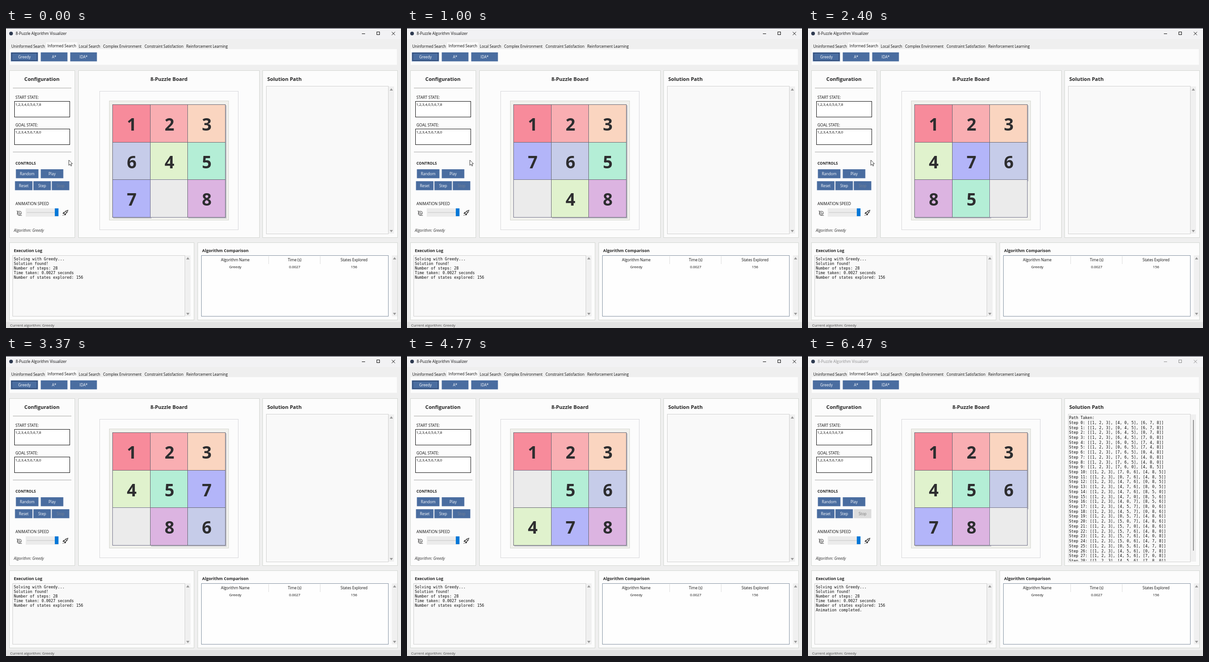
An HTML page with a canvas for the animation above (6500 ms loop, 858 by 652 pixels).

```html
<!DOCTYPE html>
<html lang="en">
<head>
<meta charset="utf-8">
<title>8-Puzzle</title>
<style>
html, body { margin: 0; width: 100%; height: 100%; overflow: hidden; background: #efefef; }
canvas { display: block; }
</style>
</head>
<body>
<canvas id="stage" width="858" height="652"></canvas>
<script>
const ctx = document.getElementById('stage').getContext('2d');
const LOOP = 6500, CURSOR_GONE = 2900, DONE = 6330;
const SANS = '"Open Sans", "Noto Sans", sans-serif';
const MONO = '"DejaVu Sans Mono", "Noto Sans Mono", monospace';
const INK = '#0c0c0c', BLUE = '#4a6da0', PANEL = '#fcfcfc', EDGE = '#d3d6d2';
const TILES = ['#ebebeb', '#f78b9b', '#f9aeb2', '#fad5c0', '#e0f2cd', '#b4eed6', '#c6cce9', '#b3b5f9', '#dcb4e1'];

// Every board along the solution, from the moves of the blank.
const OFFSET = { L: -1, R: 1, U: -3, D: 3 };
const states = [[1, 2, 3, 4, 0, 5, 6, 7, 8]];
for (const move of 'LDRULDRRULLDRRULDLURRDLULDRR') {
  const next = [...states.at(-1)];
  const blank = next.indexOf(0), other = blank + OFFSET[move];
  [next[blank], next[other]] = [next[other], 0];
  states.push(next);
}

// Solver pace: [step, time in ms], evenly spaced in between.
const PACE = [[3, 0], [7, 1010], [14, 2390], [23, 4280], [28, 5220]];

function stepAt(time) {
  for (let i = 1; i < PACE.length; i++) {
    const [s0, t0] = PACE[i - 1], [s1, t1] = PACE[i];
    if (time < t1) return Math.floor(s0 + (s1 - s0) * (time - t0) / (t1 - t0));
  }
  return 28;
}

function box(x, y, w, h, fill, stroke) {
  ctx.fillStyle = fill;
  ctx.fillRect(x, y, w, h);
  if (!stroke) return;
  ctx.strokeStyle = stroke;
  ctx.lineWidth = 1;
  ctx.strokeRect(x + 0.5, y + 0.5, w - 1, h - 1);
}

// y is the middle of the capitals.
function text(str, x, y, { size = 8.1, color = INK, style = '', align = 'left', font = SANS } = {}) {
  ctx.font = `${style} ${size}px ${font}`;
  ctx.textAlign = align;
  ctx.fillStyle = color;
  ctx.fillText(str, x, y + size * 0.36 + 0.5);
}

const heading = (str, x, y, size = 11.1, align = 'left') =>
  text(str, x, y, { size, align, style: 'bold', color: '#222' });
const mono = (str, x, y) => text(str, x, y, { size: 8.33, font: MONO });

function shape(points, fill, stroke, width = 1) {
  ctx.beginPath();
  points.forEach(([x, y]) => ctx.lineTo(x, y));
  if (fill) { ctx.closePath(); ctx.fillStyle = fill; ctx.fill(); }
  if (stroke) { ctx.strokeStyle = stroke; ctx.lineWidth = width; ctx.stroke(); }
}

function ring(x, y, r, from = 0, to = 7) {
  ctx.beginPath();
  ctx.arc(x, y, r, from, to);
  ctx.strokeStyle = '#222';
  ctx.lineWidth = 0.8;
  ctx.stroke();
}

function button(label, x, y, w, fill = BLUE, color = '#fff') {
  box(x - 0.5, y, w + 1, 19.5, fill);
  text(label, x + w / 2, y + 9.7, { color, align: 'center' });
}

function scrollbar(x, top, bottom, arrows = true) {
  box(x - 6, top, 12, bottom - top, '#f0f0f0');
  if (!arrows) return box(x - 0.5, top + 12, 1.5, 284, '#777');
  shape([[x - 3.5, top + 9], [x + 3.5, top + 9], [x, top + 4]], '#999');
  shape([[x - 3.5, bottom - 8], [x + 3.5, bottom - 8], [x, bottom - 3]], '#999');
}

function drawTitleBar(done) {
  const color = done ? '#8c8c8c' : INK;
  box(0, 0, 858, 24, '#f2f2f4');
  box(0, 0, 858, 1, '#20202c');
  ctx.beginPath();
  ctx.arc(11, 12, 4, 0, 7);
  ctx.fillStyle = '#2e3a50';
  ctx.fill();
  text('8-Puzzle Algorithm Visualizer', 21, 12, { size: 8.28, color });
  shape([[773, 12.5], [780, 12.5]], null, color);
  ctx.strokeRect(805.5, 8.5, 6, 6);
  shape([[838, 8.5], [845, 15.5]], null, color);
  shape([[845, 8.5], [838, 15.5]], null, color);
}

function drawTabs(done) {
  box(8, 46, 841, 34, PANEL);
  box(87, 31, 68, 16, '#fafafa');
  [['Uninformed Search', 11.5], ['Informed Search', 90], ['Local Search', 158], ['Complex Environment', 211],
   ['Constraint Satisfaction', 301], ['Reinforcement Learning', 391.5]]
    .forEach(([label, x], i) => text(label, x, i === 1 ? 38.5 : 40, { size: 8.05 }));
  button('Greedy', 11, 53, 58);
  button('A*', 76, 53, 57);
  button('IDA*', 140, 53, 57);
  if (!done) {
    ctx.strokeStyle = '#263c62';
    ctx.strokeRect(12.5, 54.5, 55, 16);
  }
}

function drawConfig(done) {
  box(7, 92, 143, 364, PANEL, EDGE);
  heading('Configuration', 78, 111, 11.1, 'center');
  box(15, 130, 127, 1, '#a5a5a0');
  [['START STATE:', '1,2,3,4,0,5,6,7,8', 150], ['GOAL STATE:', '1,2,3,4,5,6,7,8,0', 210]].forEach(([label, value, y]) => {
    text(label, 20.5, y, { size: 8.4 });
    box(18, y + 9, 121, 35, '#fff', '#111');
    text(value, 20, y + 16, { size: 7.95 });
  });
  box(15, 269, 127, 1, '#a5a5a5');
  heading('CONTROLS', 20.5, 293.3, 8.26);
  button('Random', 22, 307, 48);
  button('Play', 76, 307, 48);
  button('Reset', 20, 333, 37);
  button('Step', 60, 333, 37);
  if (done) button('Stop', 100, 333, 37, '#dcdcdc', '#777');
  else button('Stop', 100, 333, 37, BLUE, '#768296');
  text('ANIMATION SPEED', 20.5, 381.2, { size: 8.33 });
  box(43, 392, 71, 18, '#ebebeb');
  box(45, 400, 61, 2, '#d8d8d8');
  box(106, 392, 8, 17, '#0078d7');
  drawSnail();
  drawRocket();
  text('Algorithm: Greedy', 17, 440, { size: 8.3, style: 'italic', color: '#333' });
}

function drawSnail() {
  ring(29.5, 402, 4);
  ring(30, 402, 1.8, 0, 5);
  shape([[23, 397], [25, 399], [24.5, 405], [27, 407.5], [34.5, 407.5]], null, '#222', 0.8);
  shape([[26, 397], [25, 399]], null, '#222', 0.8);
}

function drawRocket() {
  shape([[134.5, 396], [130, 397.5], [125.5, 402.5], [128, 405], [133, 400.5], [134.5, 396]], '#fff', '#222', 1.1);
  shape([[127.5, 400], [124, 401], [123, 404], [126, 403]], '#222');
  shape([[130.5, 403], [129.5, 406.5], [126.5, 407.5], [127.5, 404.5]], '#222');
  shape([[123, 408], [125.5, 405.5]], null, '#222');
  ring(130.8, 399.8, 1);
}

function drawBoard(state) {
  box(157, 92, 394, 364, PANEL, EDGE);
  heading('8-Puzzle Board', 354, 111, 11.1, 'center');
  box(203, 137, 302, 302, PANEL, '#d6d6da');
  box(224, 158, 260, 260, '#f1f1ed', '#d5d7d0');
  const cell = 81.6;
  state.forEach((n, i) => {
    const x = Math.round(231 + i % 3 * cell), y = Math.round(166 + Math.floor(i / 3) * cell);
    if (n) box(x + 2, y + 2, 83, 83, '#c2c2ca');
    box(x, y, 83, 83, TILES[n], n ? '#686874' : '#74748c');
    if (n) text(n, x + 42, y + 43.5, { size: 37, style: 'bold', align: 'center', color: '#2d2d2f' });
  });
}

const rows = s => '[' + [0, 3, 6].map(i => `[${s.slice(i, i + 3).join(', ')}]`).join(', ') + ']';

function drawSolution(done) {
  box(557, 92, 294, 364, PANEL, EDGE);
  heading('Solution Path', 567.5, 111);
  box(565, 126, 266, 322, '#f9f9f9', '#d0d0d0');
  scrollbar(837, 127, 447, !done);
  if (!done) return;
  ctx.save();
  ctx.beginPath();
  ctx.rect(566, 127, 264, 319);
  ctx.clip();
  mono('Path Taken:', 567, 133.5);
  states.forEach((s, i) => mono(`Step ${i}: ${rows(s)}`, 567, 144.3 + i * 10.72));
  ctx.restore();
}

function drawLog(done) {
  box(7, 466, 402, 169, PANEL, EDGE);
  heading('Execution Log', 17, 483, 8.96);
  box(14, 494, 375, 133, '#f9f9f9', '#d0d0d0');
  scrollbar(395, 494, 627);
  const lines = ['Solving with Greedy...', 'Solution found!', 'Number of steps: 28',
    'Time taken: 0.0027 seconds', 'Number of states explored: 156'];
  if (done) lines.push('Animation completed.');
  lines.forEach((line, i) => mono(line, 17, 501.5 + i * 10));
}

function drawComparison() {
  box(416, 466, 435, 169, PANEL, EDGE);
  heading('Algorithm Comparison', 426, 483, 8.96);
  box(424, 494, 407, 133, '#fefefe', '#8593a3');
  scrollbar(844, 494, 627);
  [['Algorithm Name', 'Greedy', 498], ['Time (s)', '0.0027', 627], ['States Explored', '156', 756]].forEach(([title, value, x]) => {
    text(title, x, 503.5, { align: 'center' });
    text(value, x, 519, { align: 'center', size: 7.9 });
  });
  box(570, 496, 1, 17, '#dedede');
  box(682, 496, 1, 17, '#dedede');
}

function drawCursor() {
  shape([[136.5, 287], [136.5, 298.5], [139, 296], [141, 300], [142.7, 299.2], [141, 295.3], [144.3, 295], [136.5, 287]],
    '#fff', '#222', 0.9);
}

function draw(time) {
  const done = time >= DONE;
  box(0, 0, 858, 652, '#efefef');
  drawTitleBar(done);
  drawTabs(done);
  drawConfig(done);
  drawBoard(states[stepAt(time)]);
  drawSolution(done);
  drawLog(done);
  drawComparison();
  box(0, 639, 858, 13, '#e3e3e3');
  text('Current algorithm: Greedy', 9, 645.7, { size: 7.85, color: '#444' });
  if (time < CURSOR_GONE) drawCursor();
}

const start = performance.now();
function tick() {
  draw((performance.now() - start) % LOOP);
  requestAnimationFrame(tick);
}
tick();
</script>
</body>
</html>
```
